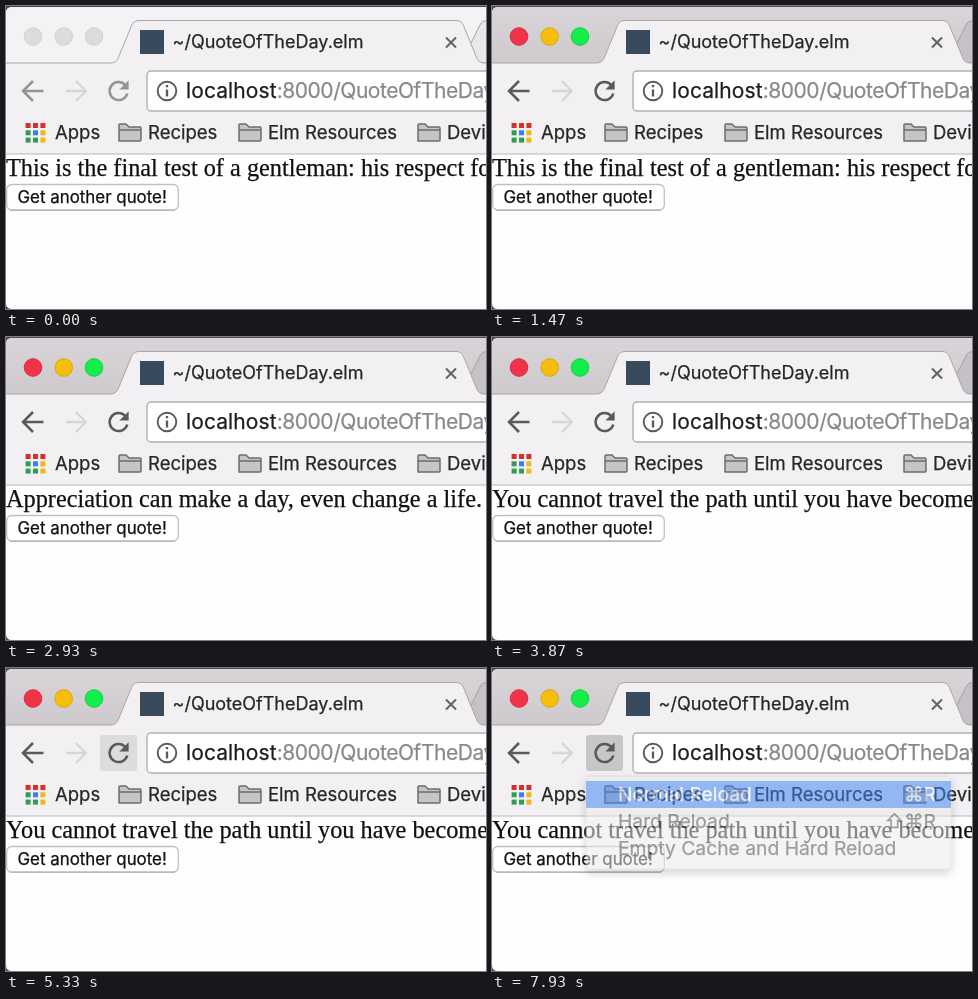
An HTML page for the animation above (8 s loop, 480 by 303 pixels).

```html
<!DOCTYPE html>
<html lang="en">
<head>
<meta charset="utf-8">
<title>Quote of the day</title>
<style>
  html, body { margin: 0; width: 100%; height: 100%; overflow: hidden; background: #fff; }
  svg { display: block; width: 480px; height: 303px; }
  text { white-space: pre; fill: currentColor; stroke: currentColor; stroke-width: .25px; }
  .ui { font: 18.5px Inter, "Open Sans", sans-serif; color: #262626; }
  .title { font-size: 18px; }
  .url { font-size: 21px; letter-spacing: -.45px; color: #8a888a; }
  .host { letter-spacing: .1px; color: #1d1d1d; fill: currentColor; stroke: currentColor; }
  .quote { font: 24.3px "Liberation Serif", "Noto Serif", serif; color: #111; }
  .button { font-size: 16.9px; color: #111; }
  .menu text { font-size: 19.3px; color: #484848; }
  .menu.chosen .first { color: #fff; }
  .menu.chosen .bar { visibility: visible; }
  .bar { visibility: hidden; fill: #3f86f3; }
  .icon { fill: none; stroke: #5b595b; stroke-width: 2.5; }
  .head { fill: #5b595b; }
  .faded .icon { stroke: #959395; }
  .faded .head { fill: #959395; }
</style>
</head>
<body>
<svg viewBox="0 0 480 303">
  <defs>
    <linearGradient id="activeBar" x2="0" y2="1">
      <stop stop-color="#d8d4d8"/><stop offset="1" stop-color="#cdc9cd"/>
    </linearGradient>
    <filter id="shadow" x="-10%" y="-20%" width="120%" height="150%">
      <feDropShadow dx="0" dy="4" stdDeviation="5" flood-opacity=".32"/>
    </filter>
    <g id="folder" fill="#c6c4c6" stroke="#6d6b6d" stroke-width="1.5" stroke-linejoin="round">
      <path d="M1 18V2Q1 1 2 1H8L11 4H22Q23 4 23 5V17Q23 18 22 18H2Q1 18 1 17Z"/>
      <path d="M1 7H23"/>
    </g>
    <path id="tabEdge" d="M0 57H106Q110 56.5 112 52.5L126 18.5Q128 14.5 132 14.5H451Q455 14.5 457 18.5L471 52.5Q473 57 478 57H480"/>
  </defs>

  <rect id="desk" width="480" height="303"/>
  <path d="M0 7Q0 1 6 1H480V303H6Q0 303 0 297Z" fill="#fefefe"/>
  <path id="titleBar" d="M0 7Q0 1 6 1H480V58H0Z"/>
  <path id="nextTab" d="M464 39L474.5 18Q476 14.5 481 14.5V57H471Z" stroke="#a3a1a3"/>
  <use href="#tabEdge" fill="#f2f0f2"/>
  <rect y="57" width="480" height="91" fill="#f2f0f2"/>
  <use href="#tabEdge" fill="none" stroke="#a9a7a9"/>
  <path d="M0 148H480" stroke="#b9b7b9"/>

  <g id="lights" stroke-width="1"></g>
  <rect x="134" y="24" width="24" height="24" fill="#3a4a5d"/>
  <text class="ui title" x="166.5" y="42">~/QuoteOfTheDay.elm</text>
  <path d="M440 31.5L450 41.5M450 31.5L440 41.5" stroke="#656365" stroke-width="2.1"/>

  <rect id="reloadBox" x="94" y="67" width="37" height="36" rx="3"/>
  <g id="controls">
    <path class="icon" d="M37.5 85H18M27 75L17 85L27 95"/>
    <path class="icon" d="M119.3 79A9 9 0 1 0 121.3 87.5"/>
    <path class="head" d="M122.6 74.2V83.4H113.4Z"/>
  </g>
  <path d="M60 85H79M70 75L79.8 85L70 95" fill="none" stroke="#d7d5d7" stroke-width="2.3"/>

  <rect x="141" y="65" width="360" height="40" rx="4" fill="#fff" stroke="#b1afb1" stroke-width="1.4"/>
  <circle cx="161" cy="85" r="9.3" fill="none" stroke="#5b595b" stroke-width="1.9"/>
  <path d="M161 79V81.3M161 83.5V90.5" stroke="#5b595b" stroke-width="2.3"/>
  <text class="ui url" x="180" y="92"><tspan class="host">localhost</tspan>:8000/QuoteOfTheDay.elm</text>

  <g id="apps"></g>
  <g id="bookmarks"></g>

  <text id="quote" class="quote" x="0" y="169.5"></text>
  <rect x=".7" y="178.5" width="171.6" height="25.5" rx="5" fill="#fff" stroke="#c1bfc5" stroke-width="1.3"/>
  <path d="M4 204.3H169" stroke="#b4b2b8"/>
  <text class="ui button" x="11.5" y="197">Get another quote!</text>

  <g id="menu" class="menu">
    <rect x="94" y="108" width="365" height="93" rx="5" fill="#ececec" stroke="#c9c7c9" stroke-width=".7" filter="url(#shadow)"/>
    <rect class="bar" x="94" y="113" width="365" height="27"/>
    <g id="items"></g>
  </g>
</svg>
<script>
const LOOP = 8000;
const TIMES = { active: 600, hover: 5130, press: 5870, menu: 6400, choose: 7400, fade: 7800 };
const FADE_LENGTH = 280;
const QUOTES = [
  [0, "This is the final test of a gentleman: his respect for those who can be of no service to him."],
  [2130, "Appreciation can make a day, even change a life."],
  [3400, "You cannot travel the path until you have become the path itself."]
];

const $ = id => document.getElementById(id);

function add(parent, tag, attrs, text = "") {
  const el = document.createElementNS("http://www.w3.org/2000/svg", tag);
  for (const key in attrs) el.setAttribute(key, attrs[key]);
  el.textContent = text;
  parent.append(el);
  return el;
}

const lights = [[27, "#f1334a", "#d92c41"], [57.7, "#f7bd0b", "#dca70f"], [88, "#13ee4b", "#17cf45"]]
  .map(([cx, fill, rim]) => ({ fill, rim, el: add($("lights"), "circle", { cx, cy: 30.5, r: 8.8 }) }));

const RED = "#d5302c", GREEN = "#2f9e50", BLUE = "#3c7df0", YELLOW = "#f3b51c";
[RED, RED, RED, GREEN, BLUE, YELLOW, GREEN, GREEN, YELLOW].forEach((fill, i) =>
  add($("apps"), "rect", {
    x: 19.6 + i % 3 * 7.4, y: 117 + Math.floor(i / 3) * 7.3, width: 5, height: 5, fill
  }));

[[49, "Apps"], [142, "Recipes"], [262, "Elm Resources"], [441, "Devin"]].forEach(([x, label], i) => {
  if (i) add($("bookmarks"), "use", { href: "#folder", x: x - 30, y: 117 });
  add($("bookmarks"), "text", { class: "ui", x, y: 133 }, label);
});

[["Normal Reload", "⌘R"], ["Hard Reload", "⇧⌘R"], ["Empty Cache and Hard Reload", ""]].forEach(([label, keys], i) => {
  const attrs = { class: i ? "ui" : "ui first", y: 133 + i * 27.2 };
  add($("items"), "text", { ...attrs, x: 126 }, label);
  add($("items"), "text", { ...attrs, x: 444, "text-anchor": "end" }, keys);
});

function draw(t) {
  const active = t >= TIMES.active;
  $("desk").setAttribute("fill", active ? "#59465c" : "#454347");
  $("titleBar").setAttribute("fill", active ? "url(#activeBar)" : "#f4f2f4");
  $("nextTab").setAttribute("fill", active ? "#c5c1c5" : "#e9e7e9");
  $("controls").setAttribute("class", active ? "" : "faded");
  for (const { el, fill, rim } of lights) {
    el.setAttribute("fill", active ? fill : "#dddbdd");
    el.setAttribute("stroke", active ? rim : "#d3d1d3");
  }

  const line = QUOTES.filter(([start]) => t >= start).pop()[1];
  if ($("quote").textContent !== line) $("quote").textContent = line;

  $("reloadBox").setAttribute("fill",
    t >= TIMES.press ? "#c8c6c8" : t >= TIMES.hover ? "#dddbdd" : "none");

  const menu = $("menu");
  menu.style.display = t >= TIMES.menu ? "" : "none";
  menu.style.opacity = 1 - Math.max(0, t - TIMES.fade) / FADE_LENGTH;
  menu.classList.toggle("chosen", t >= TIMES.choose);
}

const start = performance.now();
function tick() {
  draw((performance.now() - start) % LOOP);
  requestAnimationFrame(tick);
}
tick();
</script>
</body>
</html>
```
